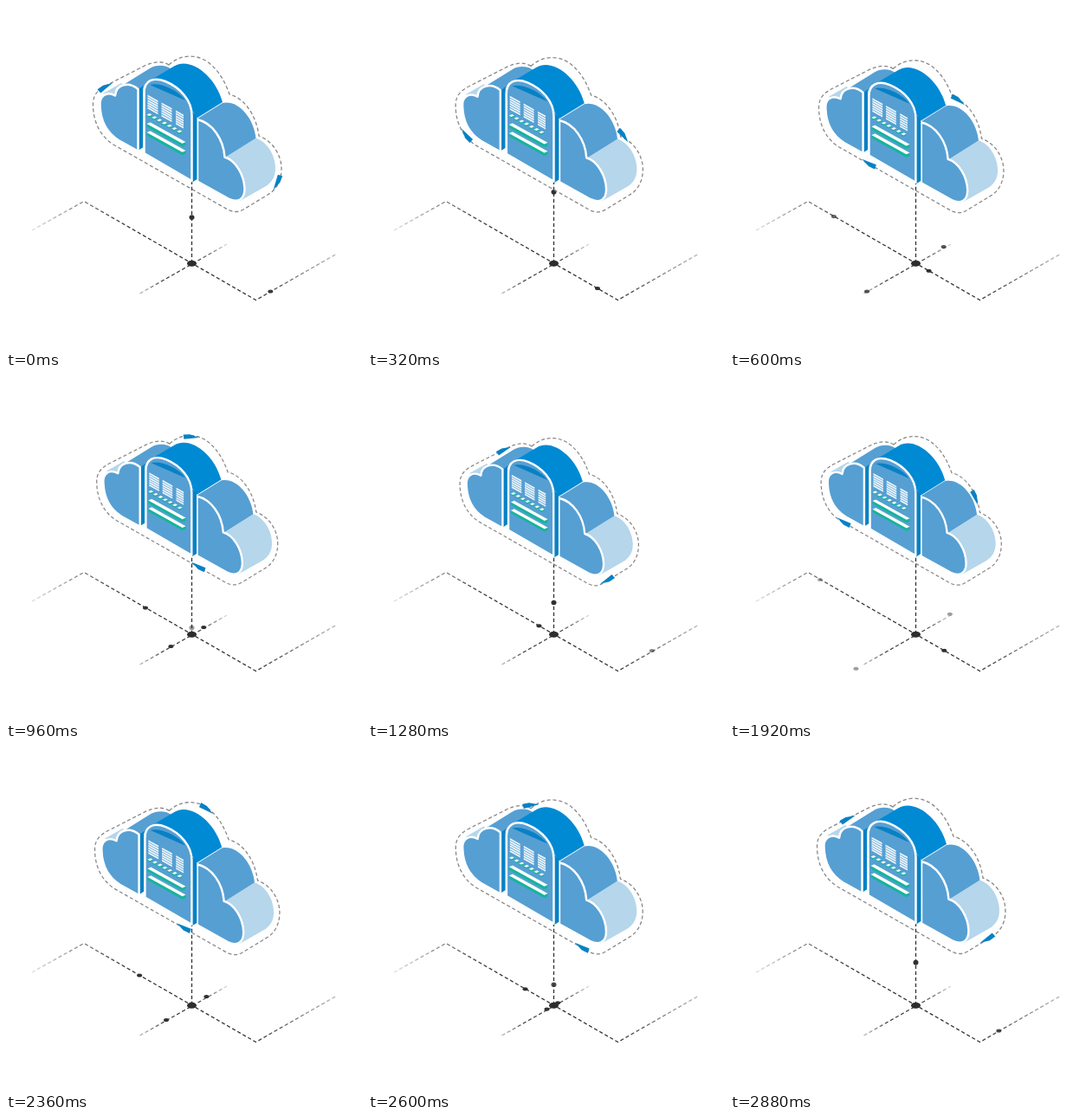
An HTML page for the animation above (2.92 s loop, 411 by 396 pixels).

```html
<!DOCTYPE html>
<html lang="en">
<head>
<meta charset="utf-8">
<title>Cloud network</title>
<style>
  html, body { margin: 0; width: 100%; height: 100%; overflow: hidden; background: #fff; }
  svg { display: block; }
  .wire { fill: none; stroke-width: 1.3; stroke-dasharray: 4.2 2.8; }
  .mid { fill: #569fd3; }
  .bright { fill: #008ad4; }
  .side { fill: #0781c5; }
  .light { fill: #b5d6eb; }
  .front { fill: #569fd3; stroke: #fff; stroke-width: 2.5; stroke-linejoin: round; }
  .teal { fill: #16b49b; }
  .white { fill: #fff; }
</style>
</head>
<body>
<svg width="411" height="396" viewBox="0 0 411 396">
  <defs>
    <linearGradient id="wide" gradientUnits="userSpaceOnUse" x1="30" x2="382" y1="0" y2="0">
      <stop offset="0" stop-color="#ddd"/>
      <stop offset=".18" stop-color="#777"/>
      <stop offset=".32" stop-color="#333"/>
      <stop offset=".73" stop-color="#333"/>
      <stop offset="1" stop-color="#bbb"/>
    </linearGradient>
    <linearGradient id="short" gradientUnits="userSpaceOnUse" x1="154" x2="256" y1="0" y2="0">
      <stop offset="0" stop-color="#bbb"/>
      <stop offset=".3" stop-color="#444"/>
      <stop offset=".7" stop-color="#444"/>
      <stop offset="1" stop-color="#ddd"/>
    </linearGradient>
  </defs>

  <!-- ground -->
  <path class="wire" stroke="url(#wide)" d="M30 259L90 225.5L288.500 339.500L382 286"/>
  <path class="wire" stroke="url(#short)" d="M154.500 332L255 275"/>
  <path class="wire" stroke="#333" d="M214.500 297V190"/>
  <g id="dots" fill="#303030"></g>
  <ellipse cx="214.500" cy="297.200" rx="5.500" ry="3.500" fill="#2d2d2d"/>

  <g id="cloud">
    <path id="outline" class="wire" stroke="#888" d="M188 68C202 55 220 56 232 64C246 74 253 88 258 102C275 106 289 126 292 150C308 156 318 172 318 188C318 203 311 213 302 218L274 235Q266 240 256 235L124 160C108 150 100 132 100.500 112C101 101 108 95.500 117 91L160 69C172 63.500 181 63.500 188 68Z"/>
    <g id="arrows"></g>

    <!-- left lobe -->
    <path class="light" d="M112 101L133 89L138 93L127 104Z"/>
    <path class="mid" d="M129 95L166 72C174 67 185 68 191 73L160 93L152 98Z"/>
    <path class="side" d="M153 96L158.500 92V163L153 166.500Z"/>
    <path class="front" d="M108.500 115C107.500 104 116 98 126 103.500C127 90 142 87 152.500 96V167.500L130 155C116 146 109 131 108.500 115Z"/>

    <!-- right lobe -->
    <path class="mid" d="M221 130L250 112C267 108 286 128 288.500 153L253 175Z"/>
    <path class="light" d="M253 175L288.500 152.500C302 157 311 173 311 188C311 198 306 204 300 208L270 225Z"/>
    <path class="front" d="M221 131C238 135 251 153 252.500 174.500C265 178 275 195 275.500 211C275.500 224 267 227.500 257 222.500L221 202.500Z"/>

    <!-- middle lobe -->
    <path class="bright" d="M163 88L194 69.500C213 58 242 81 250 111L221 129L214 120Z"/>
    <path class="side" d="M215 122L220.500 127V200L215 203.500Z"/>
    <path class="front" d="M159.500 170V100C159.500 86 170 81.500 184 87C201 94 214.500 109 214.500 126V202Z"/>
    <path class="side" d="M166 91C176 88 198 96 207 109Z"/>
    <g id="panel" transform="translate(162.500 102) skewY(29)">
      <g fill="none" stroke="#fff" stroke-opacity=".9" stroke-dasharray="2 .8">
        <path stroke-width="12" d="M7 0v16M23 0v16"/>
        <path stroke-width="9" d="M38 0v16"/>
      </g>
    </g>
  </g>
</svg>
<script>
const LOOP = 2920, DOT_PERIOD = 1460, ARROW_PERIOD = 1500;
const byId = id => document.getElementById(id);
const outline = byId('outline'), length = outline.getTotalLength();

function add(parent, tag, attrs) {
  const el = document.createElementNS('http://www.w3.org/2000/svg', tag);
  for (const key in attrs) el.setAttribute(key, attrs[key]);
  return byId(parent).appendChild(el);
}

// A white-topped slab with a teal front edge
function slab(x, y, width, depth, edge) {
  const top = `l${depth} ${-depth}h${width}`;
  add('panel', 'path', { class: 'teal', d: `M${x} ${y + depth}${top}v${edge}l${-depth} ${depth}h${-width}Z` });
  add('panel', 'path', { class: 'white', d: `M${x} ${y + depth}${top}l${-depth} ${depth}Z` });
}
for (let i = 0; i < 7; i++) slab(i * 5.8, 20, 2.6, 3.5, 1.5);
slab(0, 30, 41, 4, 3.5);
slab(0, 40, 41, 4, 3.5);

function dot(route, start, duration, ry = 2) {
  const el = add('dots', 'ellipse', { rx: 3, ry });
  const path = document.createElementNS('http://www.w3.org/2000/svg', 'path');
  path.setAttribute('d', route);
  return { el, path, start, duration };
}
const dots = [
  dot('M97 230L214.5 297', 400, 1030),
  dot('M140 340L214.5 297', 400, 830),
  dot('M257 272L214.5 297', 400, 830),
  dot('M343 307L288.5 339.5L214.5 297', 1160, 1020),
  dot('M214.5 297V204', 880, 1020, 2.8)
];
const arrows = [0, .5].map(shift => ({
  shift,
  el: add('arrows', 'path', { class: 'side', d: 'M-9-2L-1-2.500L10 1L-8 3.500Z' })
}));

const wrap = (value, size) => (value % size + size) % size;
const pointAt = s => outline.getPointAtLength(wrap(s, length));

function draw(t) {
  const k = (1 - Math.cos(2 * Math.PI * t / 2960)) / 2;
  byId('cloud').setAttribute('transform',
    `translate(209 ${147 + 8.3 * k}) scale(${1 - .054 * k}) translate(-209 -147)`);

  for (const { el, path, start, duration } of dots) {
    const f = wrap(t - start, DOT_PERIOD) / duration;
    const p = path.getPointAtLength(Math.min(f, 1) * path.getTotalLength());
    el.setAttribute('cx', p.x);
    el.setAttribute('cy', p.y);
    el.setAttribute('opacity', f < 1 ? Math.min(1, 1.7 * Math.sqrt(f)) : 0);
  }

  for (const { shift, el } of arrows) {
    const s = length * (1 - shift - t / ARROW_PERIOD / 2) - 81;
    const a = pointAt(s - 9), b = pointAt(s + 9);
    const angle = Math.atan2(b.y - a.y, b.x - a.x) * 180 / Math.PI;
    el.setAttribute('transform', `translate(${(a.x + b.x) / 2} ${(a.y + b.y) / 2}) rotate(${angle})`);
  }
}

const begin = performance.now();
function tick() {
  draw((performance.now() - begin) % LOOP);
  requestAnimationFrame(tick);
}
tick();
</script>
</body>
</html>
```
